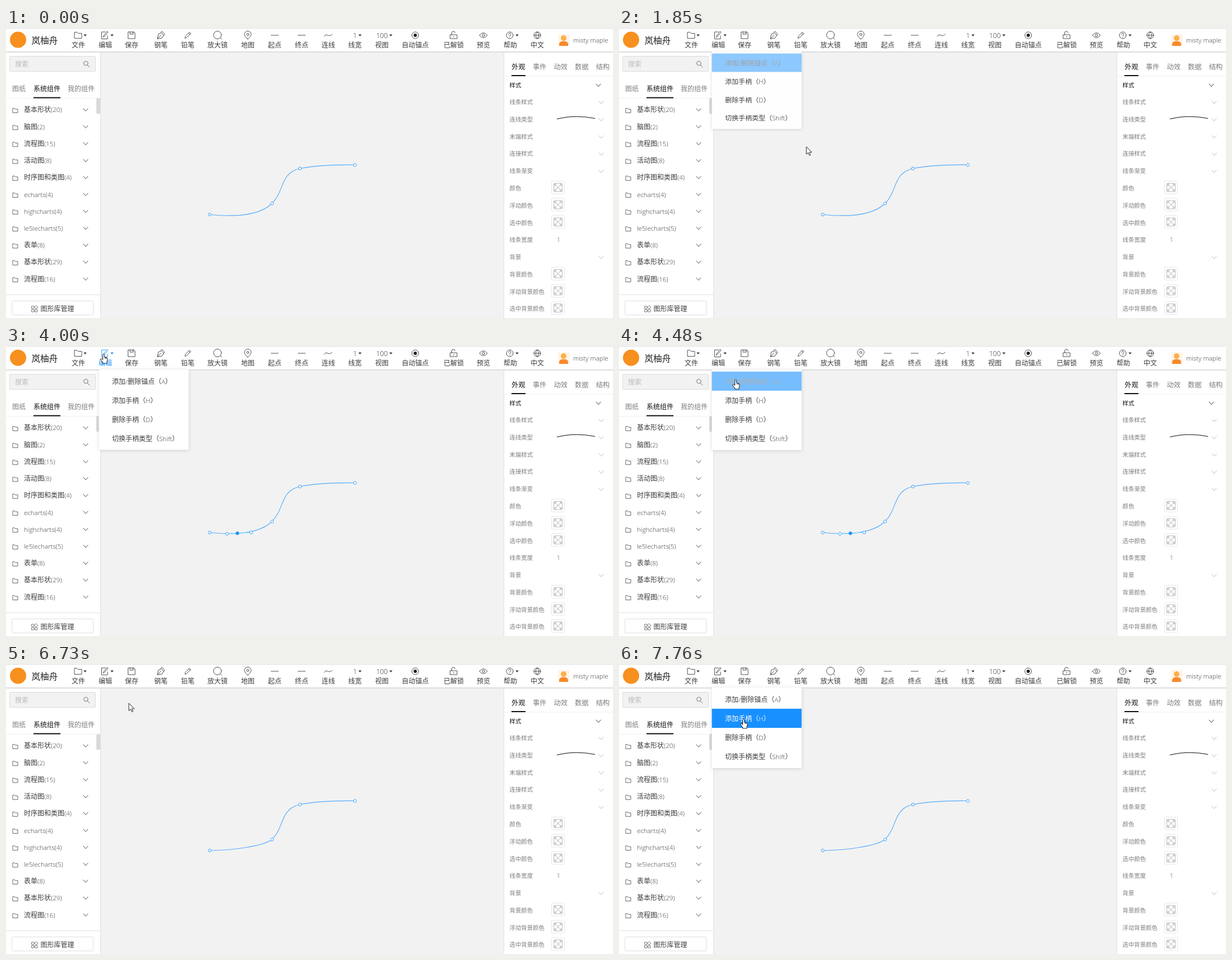
Recreate the animation shown at these times as an HTML page. Size 1082x518 px, loop 8000 ms.

```html
<!DOCTYPE html>
<html lang="zh-CN">
<head>
<meta charset="utf-8">
<title>线条编辑</title>
<style>
  html, body { margin: 0; width: 100%; height: 100%; overflow: hidden; background: #f2f2f2; }
  svg { display: block; width: 100%; height: 100%; }
  text { font-family: "Open Sans", "Noto Sans CJK SC", "Noto Sans CJK", sans-serif; font-weight: 350; }
  .icon { fill: none; stroke: currentColor; stroke-width: .9; stroke-linecap: round; stroke-linejoin: round; }
  .menu-box { filter: drop-shadow(0 1px 3px rgba(0, 0, 0, .14)); }
</style>
</head>
<body>
<svg id="stage" viewBox="0 0 1082 518" preserveAspectRatio="none"></svg>
<script>
const LOOP = 8000;
const STEP = 78;
const BLUE = '#1890ff';
const LINE = '#55abfc';
const RED = '#ee6a45';
const INK = '#3c3c3c';
const MUTED = '#7d7d7d';
const stage = document.getElementById('stage');

function add(parent, tag, attrs = {}, content) {
  const el = document.createElementNS('http://www.w3.org/2000/svg', tag);
  for (const name in attrs) el.setAttribute(name, attrs[name]);
  if (content !== undefined) el.textContent = content;
  parent.appendChild(el);
  return el;
}
const group = (parent, attrs) => add(parent, 'g', attrs);
const rect = (parent, x, y, width, height, fill, more) =>
  add(parent, 'rect', { x, y, width, height, fill, ...more });
const icon = (parent, x, y, d, more) =>
  add(parent, 'path', { class: 'icon', d, transform: `translate(${x} ${y})`, ...more });
const chevron = (x, y, color) => icon(stage, x, y, 'M-4-2L0 2.5L4-2', { color });
const circle = (parent, cx, cy, r, attrs) => add(parent, 'circle', { cx, cy, r, ...attrs });

// Latin runs are set slightly smaller than the Chinese around them
function label(parent, x, mid, content, size = 12, fill = INK, more) {
  const el = add(parent, 'text', { x, y: mid + size * .37, 'font-size': size, fill, ...more });
  for (const run of content.match(/[ -~]+|[^ -~]+/g))
    add(el, 'tspan', { 'font-size': /[ -~]/.test(run) ? size * .965 : size }, run);
  return el;
}

const CENTERED = { 'text-anchor': 'middle' };
const FOLDER = 'M-6 5V-5.5H-1.5L.5-3.5H7V5Z';
const SMALL_FOLDER = 'M-4.5 4V-3.5H-1.2L0-2H4.5V4Z';

// Side panels and header
rect(stage, 0, 0, 1082, 518, '#f2f2f2');
rect(stage, 0, 43, 168, 475, '#fff');
rect(stage, 168, 43, 1, 475, '#e0e0e0');
rect(stage, 888, 43, 194, 475, '#fff');
rect(stage, 887, 43, 1, 475, '#e0e0e0');
rect(stage, 0, 42, 1082, 1, '#d4d4d4');
rect(stage, 0, 43, 1082, 1, '#e6e6e6');
rect(stage, 0, 0, 1082, 42, '#fff');
rect(stage, 0, 0, 1082, 1, '#dedede');

circle(stage, 21.5, 21, 14.5, { fill: '#f7901e' });
label(stage, 45.5, 22, '岚柚舟', 15.6, '#222');
rect(stage, 984, 11, 21, 21, '#fff4e8', { rx: 2 });
circle(stage, 994, 18, 5, { fill: '#fbb04c' });
add(stage, 'path', { d: 'M986 32V29Q986 23.5 994 23.5T1002 29V32Z', fill: '#f88a2b' });
label(stage, 1011, 21.5, 'misty maple', 12);

const tools = [
  ['文件', 129, FOLDER, 141],
  ['编辑', 177, 'M1-6H-5.5V6.5H5V1M-2.5 3L-2 1L4-7L6-5.5L-.5 2Z', 189],
  ['保存', 224, 'M-6-6H4L6-4V6H-6ZM-3-6V-2H3V-6M1-5V-4'],
  ['钢笔', 276, 'M-6 6L-4.5-2L1-4.5L5 0L2.5 4.5ZM-6 6L-.5 .5M0-5.5L2-7L7-1.5L5 0M-.5 .5h.6'],
  ['铅笔', 324, 'M-5 5L-4 1.5L3-5.5L5.5-3L-2 4ZM1.5-4L4-1.5'],
  ['放大镜', 377, 'M7-.5A7 7 0 1 1-7-.5A7 7 0 0 1 7-.5M5 4.5L7.5 7'],
  ['地图', 431, 'M0 7Q-6 1.5-6-1.5A6 6 0 0 1 6-1.5Q6 1.5 0 7M2-1.5A2 2 0 1 1-2-1.5A2 2 0 0 1 2-1.5'],
  ['起点', 479, 'M-6.5 0H6.5'],
  ['终点', 527, 'M-6.5 0H6.5'],
  ['连线', 574.5, 'M-7 2C-3-6 1 6 7-2'],
  ['线宽', 622, '', 631, '1'],
  ['视图', 670, '', 686, '100'],
  ['自动锚点', 729.5, 'M6 0A6 6 0 1 1-6 0A6 6 0 0 1 6 0'],
  ['已解锁', 798, 'M-6-1H6V6H-6ZM-3.5-1V-4A3 3 0 0 1 2.5-4.5M0 2V3.5'],
  ['预览', 851, 'M-7 0Q0-9 7 0Q0 9-7 0M2.2 0A2.2 2.2 0 1 1-2.2 0A2.2 2.2 0 0 1 2.2 0'],
  ['帮助', 899, 'M6 0A6 6 0 1 1-6 0A6 6 0 0 1 6 0M-2-1.5A2 2 0 1 1 .8 .2Q0 .5 0 1.8M0 3.6V3.7', 911],
  ['中文', 947, 'M6 0A6 6 0 1 1-6 0A6 6 0 0 1 6 0M-6 0H6M0-6Q-6 0 0 6M0-6Q6 0 0 6']
].map(([name, x, shape, caret, value]) => {
  const tool = group(stage, { color: INK });
  label(tool, x, 31, name, 12, 'currentColor', CENTERED);
  if (shape) icon(tool, x - (caret ? 1 : 0), 13, shape);
  if (value) label(tool, x, 13.5, value, 12.5, 'currentColor', CENTERED);
  if (caret) add(tool, 'path', { d: `M${caret - 2.8} 11.5h5.6l-2.8 3.4z`, fill: 'currentColor' });
  return tool;
});
circle(stage, 729.5, 13, 3, { fill: '#222' });
const editTool = tools[1];

// Left panel
rect(stage, 6.5, 50.5, 153, 27, '#f2f2f2', { stroke: '#dcdcdc', rx: 1 });
label(stage, 16, 65, '搜索', 12, '#bbb');
icon(stage, 143, 64, 'M3-1A3.7 3.7 0 1 1-4.4-1A3.7 3.7 0 0 1 3-1M2 2L6 6', { color: '#666' });
label(stage, 11, 108.5, '图纸', 12, MUTED);
label(stage, 49, 108.5, '系统组件', 12, '#111');
label(stage, 110, 108.5, '我的组件', 12, MUTED);
rect(stage, 0, 125, 168, 1, '#f0f0f0');
rect(stage, 49, 123.5, 48, 2, '#111');
['基本形状(20)', '脑图(2)', '流程图(15)', '活动图(8)', '时序图和类图(4)', 'echarts(4)',
  'highcharts(4)', 'le5lecharts(5)', '表单(8)', '基本形状(29)', '流程图(16)'].forEach((name, i) => {
  const y = 146 + i * 30.22;
  icon(stage, 16.5, y + 1, SMALL_FOLDER, { color: '#555' });
  label(stage, 32, y, name);
  chevron(142, y, INK);
});
rect(stage, 161, 125, 7, 28.5, '#d9d9d9', { rx: 3 });
rect(stage, 0, 476, 168, 1, '#e2e2e2');
rect(stage, 10.5, 487.5, 145, 25, '#fff', { stroke: '#dfdfdf', rx: 1 });
icon(stage, 51, 502, 'M-5-5H-1V-1H-5ZM-5 1H-1V5H-5ZM1 1H5V5H1ZM3-6L6-3L3 0L0-3Z', { color: '#666' });
label(stage, 61.5, 502, '图形库管理');

// Right panel
['外观', '事件', '动效', '数据', '结构'].forEach((name, i) =>
  label(stage, 901.3 + i * 37.6, 69.5, name, 12.2, i ? MUTED : '#111'));
rect(stage, 888, 85.5, 194, 1, '#f0f0f0');
rect(stage, 901, 84, 25, 2, '#111');
label(stage, 897.5, 102.5, '样式', 10.4, '#111', { 'font-weight': 700 });
chevron(1056, 102, '#222');

function swatch(x, y) {
  rect(stage, x - 11.5, y - 11.5, 23, 23, '#fff', { stroke: '#e6e6e6', rx: 2 });
  rect(stage, x - 7.5, y - 7.5, 15, 15, '#fff', { stroke: '#bdbdbd', rx: 1.5 });
  for (const dx of [-1, 1]) for (const dy of [-1, 1])
    rect(stage, x + dx * 5 - 2, y + dy * 5 - 2, 4, 4, '#cfcfcf');
  icon(stage, x, y, 'M-3-3L3 3M3-3L-3 3', { color: '#a8a8a8', 'stroke-width': 1.3 });
}
['线条样式', '连线类型', '末端样式', '连接样式', '线条渐变', '颜色', '浮动颜色', '选中颜色',
  '线条宽度', '背景', '背景颜色', '浮动背景颜色', '选中背景颜色'].forEach((name, i) => {
  const y = 132.3 + i * 30.77;
  label(stage, 897.5, y, name, 10.4, MUTED);
  if (i < 5 || i === 9) chevron(1061, y + .5, '#b5b5b5');
  else if (i === 8) label(stage, 982, y, '1', 10.4);
  else swatch(984, y - 1.3);
});
add(stage, 'path', { d: 'M982 162.5Q1014 154.5 1050 161.5', fill: 'none', stroke: '#111', 'stroke-width': 1.1 });

// Edited line
const TAIL = ' 474 313.5C497 291 488 259 524 251C555 245 590 244 622 244.5';
const FULL = 'M363 333.2C400 337 450 337' + TAIL;
const FLAT = 'M363 333.2C400 333 458 326' + TAIL;
const curve = add(stage, 'path', { fill: 'none', stroke: LINE, 'stroke-width': 1.15 });
const anchors = [[363, 333.2], [474.3, 313.5], [524, 251], [622, 244.7]].map(([x, y]) =>
  circle(stage, x, y, 2.6, { fill: '#fff', 'stroke-width': 1 }));
const handles = group(stage, { stroke: '#3a9ffb' });
add(handles, 'path', { d: 'M394 335.5L437 333', stroke: '#7fe0fb', 'stroke-width': 1.2 });
circle(handles, 394, 335.5, 2.6, { fill: '#fff' });
circle(handles, 437, 333, 2.6, { fill: '#fff' });
circle(handles, 412.5, 334.5, 2.8, { fill: BLUE });

// Dropdown
const menu = group(stage);
rect(menu, 165.5, 42, 160, 144, '#fff', { class: 'menu-box' });
const items = ['添加/删除锚点（A）', '添加手柄（H）', '删除手柄（D）', '切换手柄类型（Shift）'].map((name, i) => {
  const top = 45.7 + i * 34.2;
  return {
    back: rect(menu, 165.5, top, 160, 34.2, BLUE),
    text: label(menu, 189, top + 17.6, name)
  };
});

// Pointers, each with its hot spot at the origin
const pointer = group(stage);
const outlined = { fill: '#fff', stroke: '#222', 'stroke-width': 1, 'stroke-linejoin': 'round' };
const shapes = {
  arrow: add(pointer, 'path', { d: 'M0 0V13.5L3.2 10.7L5.4 15.6L7.4 14.7L5.3 9.9H9.6Z', ...outlined }),
  hand: add(pointer, 'path', {
    d: 'M-1.4 1Q0-1 1.4 1V6L6 7.2Q7.2 7.8 7 9.5L6 14V17H-1.5V15L-5.5 10Q-5.5 8-3.2 8.8L-1.4 10.5ZM2.8 6.5V9M5 7V9.3',
    ...outlined
  }),
  move: add(pointer, 'path', {
    d: 'M0-9.7L4-5.7H1.6V-1.6H5.7V-4L9.7 0L5.7 4V1.6H1.6V5.7H4L0 9.7L-4 5.7H-1.6V1.6H-5.7V4L-9.7 0L-5.7-4V-1.6H-1.6V-5.7H-4Z',
    ...outlined
  }),
  bar: add(pointer, 'path', { d: 'M-7-3.5V2.5M7-3.5V2.5M-7-.5H-4M2-.5H7', fill: 'none', stroke: '#111', 'stroke-width': 1.5 })
};

// Timeline
const path = [
  [120, 503, 388], [590, 176, 14], [1130, 176, 14], [1440, 208, 60], [1620, 208, 60], [1850, 334, 212],
  [1910, 360, 280], [2000, 360, 280], [2460, 413, 334], [3149, 413, 334], [3150, 397, 330],
  [3550, 170, 12], [3720, 170, 12], [3860, 160, 8], [4000, 174, 14], [4480, 208, 60], [4870, 208, 60],
  [5030, 380, 310], [5110, 414.5, 334], [5270, 406, 342], [5550, 411, 334], [6500, 411, 334],
  [6730, 219, 70], [6960, 176, 14], [7340, 176, 14], [7760, 222, 98]
];
const kinds = [
  [0, ''], [120, 'arrow'], [590, 'hand'], [1690, 'arrow'], [2380, 'move'], [2770, 'bar'], [3150, 'move'],
  [3228, 'arrow'], [3470, 'hand'], [4948, 'arrow'], [5110, 'bar'], [5190, 'move'], [5400, 'bar'],
  [6270, 'move'], [6578, 'arrow'], [6960, 'hand']
];
const openings = [[800, 1700], [3930, 4870], [7080, 9000]];
const hovers = [[0, 1330, 1770], [0, 4380, 4900], [0, 7360, 7470], [1, 7470, 9000]];

const clamp = v => Math.min(1, Math.max(0, v));
const within = (t, from, to) => t >= from && t < to;
const lastBefore = (rows, t) => rows.findLastIndex(row => row[0] <= t);
const fade = v => 1 - (1 - clamp(v)) ** 2;

function pointerAt(t) {
  const i = Math.max(0, lastBefore(path, t));
  const [t0, x0, y0] = path[i];
  const [t1, x1, y1] = path[i + 1] || [LOOP, x0, y0];
  const p = clamp(Math.floor((t - t0) / STEP) * STEP / (t1 - t0));
  return [x0 + (x1 - x0) * p, y0 + (y1 - y0) * p];
}

function menuLevel(t) {
  const range = openings.find(([from, to]) => within(t, from, to + 210));
  if (!range) return 0;
  const [from, to] = range;
  return t < to ? 1 - (1 - clamp((t - from) / 130)) ** 5 : 1 - clamp((t - to) / 210) ** 5;
}

function render(t) {
  const [x, y] = pointerAt(t);
  const kind = kinds[lastBefore(kinds, t)][1];
  pointer.setAttribute('transform', `translate(${x} ${y})`);
  for (const name in shapes) shapes[name].style.display = name === kind ? '' : 'none';
  editTool.setAttribute('color', kind === 'hand' && x < 196 && y < 42 ? BLUE : INK);

  const active = within(t, 2380, 3228) || within(t, 5190, 6578);
  for (const anchor of anchors) anchor.setAttribute('stroke', active ? RED : '#3a9ffb');
  handles.style.display = within(t, 2610, 6120) ? '' : 'none';
  curve.setAttribute('d', t < 6120 ? FULL : FLAT);

  const level = menuLevel(t);
  menu.style.display = level > 0 ? '' : 'none';
  menu.setAttribute('opacity', Math.min(1, level * 1.2));
  menu.setAttribute('transform', `translate(0 42) scale(1 ${.8 + .2 * level}) translate(0 -42)`);
  items.forEach(({ back, text }, i) => {
    let amount = 0;
    for (const [item, from, to] of hovers)
      if (item === i) amount += fade((t - from) / 280) - fade((t - to) / 280);
    amount = clamp(amount);
    const tone = Math.round(60 + 195 * amount);
    back.setAttribute('opacity', amount);
    text.setAttribute('fill', `rgb(${tone},${tone},${tone})`);
  });
}

const start = performance.now();
function tick() {
  render((performance.now() - start) % LOOP);
  requestAnimationFrame(tick);
}
tick();
</script>
</body>
</html>
```
